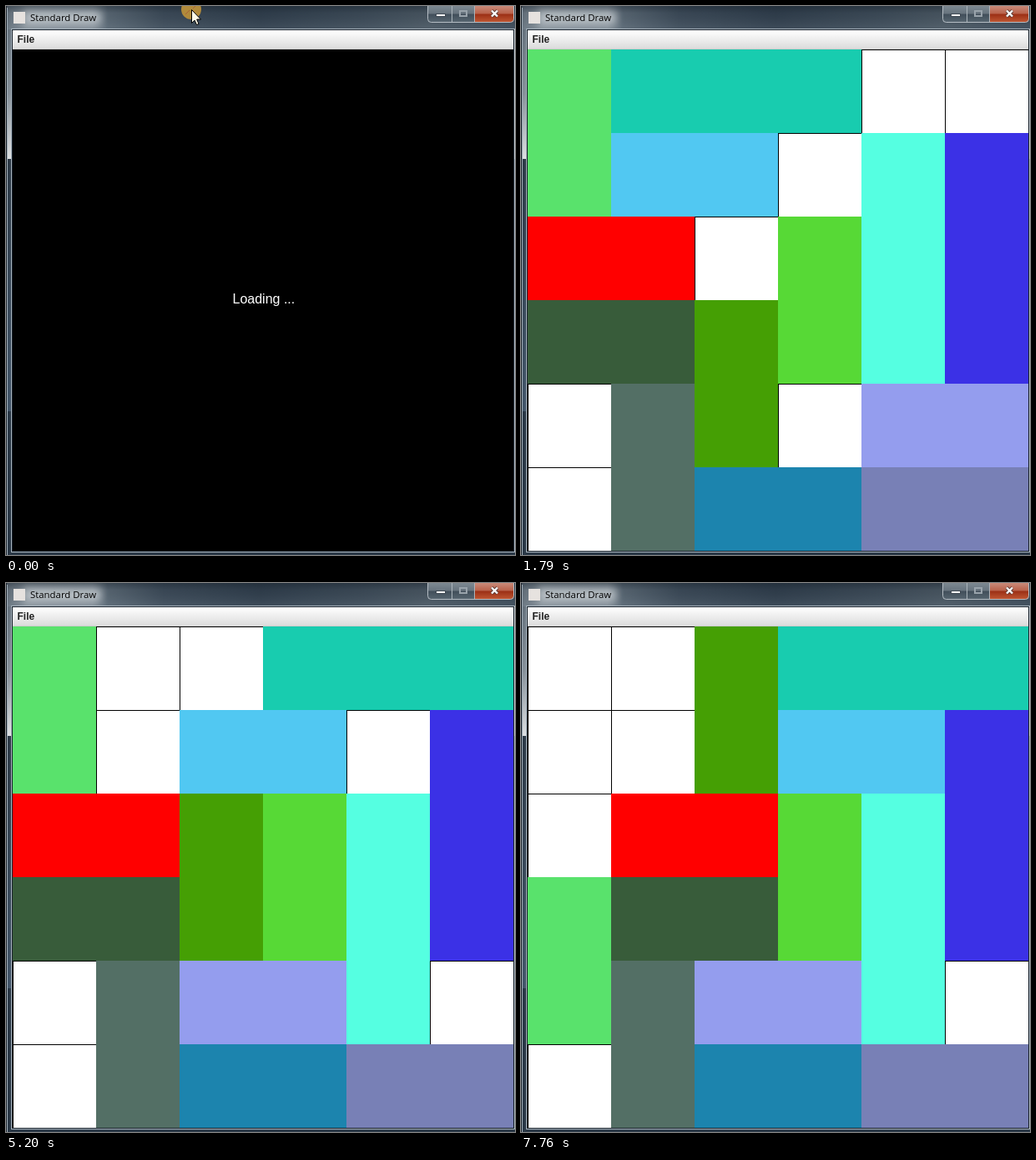
Animation of 610x657 px, one loop 8000 ms. Source, as an HTML page with a canvas:

```html
<!DOCTYPE html>
<html lang="en">
<head>
<meta charset="utf-8">
<title>Standard Draw</title>
<style>
html, body { margin: 0; width: 100%; height: 100%; overflow: hidden; background: #2b3947; }
canvas { display: block; }
</style>
</head>
<body>
<canvas id="stage" width="610" height="657"></canvas>
<script>
const ctx = document.getElementById('stage').getContext('2d');
const LOOP = 8000, CELL = 100, LEFT = 8, TOP = 52, N = 6;

// id: [column, row, width, height, colour]
const CARS = {
  teal:   [0, 0, 3, 1, '#18ccaf'],
  lime:   [3, 0, 1, 2, '#57d936'],
  aqua:   [4, 0, 1, 3, '#55ffe1'],
  blue:   [5, 0, 1, 3, '#3b31e6'],
  mint:   [0, 1, 1, 2, '#59e26c'],
  sky:    [1, 1, 2, 1, '#51c8f2'],
  red:    [2, 2, 2, 1, '#ff0000'],
  forest: [0, 3, 2, 1, '#385c3a'],
  leaf:   [2, 3, 1, 2, '#459f04'],
  slate:  [1, 4, 1, 2, '#536f65'],
  lilac:  [4, 4, 2, 1, '#949dee'],
  sea:    [2, 5, 2, 1, '#1c84ae'],
  dusk:   [4, 5, 2, 1, '#7880b6']
};

// [time, car, column step, row step]
const MOVES = [
  [830, 'red', -1, 0],
  [1060, 'lime', 0, 2],
  [1790, 'red', -1, 0], [1790, 'mint', 0, -1], [1790, 'teal', 1, 0],
  [1790, 'aqua', 0, 1], [1790, 'blue', 0, 1],
  [3340, 'leaf', 0, -1],
  [3680, 'teal', 1, 0], [4010, 'teal', 1, 0],
  [4270, 'lilac', -1, 0], [4610, 'lilac', -1, 0],
  [4930, 'aqua', 0, 1],
  [5200, 'sky', 1, 0], [5540, 'sky', 1, 0],
  [5850, 'leaf', 0, -1], [6150, 'leaf', 0, -1],
  [6470, 'red', 1, 0],
  [6800, 'mint', 0, 1],
  [7120, 'forest', 1, 0],
  [7430, 'mint', 0, 1], [7760, 'mint', 0, 1]
];

function rect(x, y, w, h, fill) {
  ctx.fillStyle = fill;
  ctx.fillRect(x, y, w, h);
}

function blend(x0, y0, x1, y1, ...stops) {
  const g = ctx.createLinearGradient(x0, y0, x1, y1);
  stops.forEach(([at, colour]) => g.addColorStop(at, colour));
  return g;
}

function text(str, x, y, font, colour) {
  ctx.font = font;
  ctx.fillStyle = colour;
  ctx.fillText(str, x, y);
}

function shape(points, fill, stroke) {
  ctx.beginPath();
  points.forEach(([x, y]) => ctx.lineTo(x, y));
  ctx.closePath();
  ctx.fillStyle = fill;
  ctx.fill();
  if (stroke) {
    ctx.strokeStyle = stroke;
    ctx.lineWidth = 1;
    ctx.stroke();
  }
}

function drawTitle() {
  rect(0, 0, 610, 28, blend(0, 0, 610, 0, [0, '#66727d'], [0.04, '#8a949c'],
    [0.17, '#818c95'], [0.2, '#5a6874'], [0.31, '#3d4b59'], [0.5, '#303e4c'],
    [0.7, '#3d4b58'], [0.83, '#4a5762'], [1, '#3a4856']));
  rect(0, 0, 610, 28, blend(0, 0, 0, 28, [0, 'rgba(20,30,40,.45)'],
    [0.3, 'rgba(20,30,40,.1)'], [1, 'rgba(140,155,168,.16)']));
  ctx.save();
  ctx.filter = 'blur(5px)';
  rect(22, 7, 92, 15, 'rgba(225,230,234,.6)');
  ctx.restore();
  rect(9, 7, 14, 14, '#e6e2df');
  text('Standard Draw', 29, 18, '11.4px "Open Sans", "Noto Sans", sans-serif', '#000');
}

function drawButtons() {
  ctx.save();
  ctx.beginPath();
  ctx.roundRect(505.5, -4, 103, 23.5, [0, 0, 4, 4]);
  ctx.clip();
  rect(505, 0, 57, 20, blend(0, 0, 0, 20, [0, '#7c8891'], [0.45, '#68747e'],
    [0.5, '#414e5a'], [1, '#596772']));
  rect(562, 0, 48, 20, blend(0, 0, 0, 20, [0, '#c98a79'], [0.45, '#b9624b'],
    [0.5, '#9b2f15'], [1, '#c25a35']));
  rect(534, 0, 1, 20, '#abb4bb');
  rect(561, 0, 1, 20, '#abb4bb');
  ctx.restore();
  ctx.strokeStyle = '#b4bcc3';
  ctx.lineWidth = 1;
  ctx.stroke();

  rect(515, 9, 12, 4, '#404a54');
  rect(516, 10, 10, 2, '#fff');
  ctx.strokeStyle = '#99a3ab';
  ctx.lineWidth = 2;
  ctx.strokeRect(544, 6, 8, 6);
  [[4, '#5b3b36'], [2.4, '#fff']].forEach(([width, colour]) => {
    ctx.strokeStyle = colour;
    ctx.lineWidth = width;
    ctx.beginPath();
    ctx.moveTo(582, 5.5); ctx.lineTo(589, 12.5);
    ctx.moveTo(589, 5.5); ctx.lineTo(582, 12.5);
    ctx.stroke();
  });
}

function drawWindow() {
  rect(0, 0, 610, 657, '#2b3947');
  drawTitle();
  rect(0, 28, 8, 155, blend(0, 28, 0, 183, [0, '#66727d'], [0.5, '#87919a'], [1, '#dde0e2']));
  rect(0, 183, 8, 302, blend(0, 183, 0, 485, [0, '#2d3a47'], [1, '#43566a']));
  rect(0, 485, 8, 172, '#2a3846');
  rect(0, 0, 1, 657, '#1b232b');
  rect(1, 2, 1, 655, '#a3b0bb');
  rect(6, 27, 604, 627, '#a9b5bf');
  rect(7, 28, 602, 625, '#17202a');
  rect(609, 28, 1, 155, '#c3cad0');
  rect(8, 29, 600, 23, blend(0, 29, 0, 52, [0, '#ffffff'], [1, '#dadada']));
  rect(8, 51, 600, 1, '#cccccc');
  text('File', 13.5, 44, 'bold 12px "Liberation Sans", Arial, sans-serif', '#222');
  drawButtons();
}

function drawBoard(t) {
  rect(LEFT, TOP, N * CELL, N * CELL, '#000');
  if (t < 500) {
    text('Loading ...', 271.5, 356, '16px "Liberation Sans", Arial, sans-serif', '#fff');
    return;
  }
  for (let i = 0; i < N * N; i++) {
    rect(LEFT + i % N * CELL + 1, TOP + Math.floor(i / N) * CELL + 1, CELL - 1, CELL - 1, '#fff');
  }
  for (const id in CARS) {
    let [col, row, w, h, colour] = CARS[id];
    for (const [at, car, dx, dy] of MOVES) {
      if (car === id && t >= at) { col += dx; row += dy; }
    }
    rect(LEFT + col * CELL, TOP + row * CELL, w * CELL, h * CELL, colour);
  }
}

function drawPointer(t) {
  if (t >= 1790) return;
  const [x, y] = t < 1600 ? [222, 4] : t < 1640 ? [400, 75] : [492, 111];
  const marked = t < 1060;
  if (marked) {
    ctx.beginPath();
    ctx.arc(x, y, 12, 0, Math.PI * 2);
    ctx.fillStyle = '#b18a3b';
    ctx.fill();
    ctx.strokeStyle = '#a8603a';
    ctx.lineWidth = 1;
    ctx.beginPath();
    ctx.moveTo(x - 7, y + 6); ctx.lineTo(x - 2, y + 1);
    ctx.moveTo(x + 2, y - 1); ctx.lineTo(x + 5, y - 4);
    ctx.stroke();
  }
  const arrow = [[0.5, 0.5], [0.5, 16.5], [4, 13], [6.5, 18.5], [9, 17.5], [6.7, 12], [11.5, 12]];
  shape(arrow.map(([dx, dy]) => [x + dx, y + dy]), marked ? '#fffbe8' : '#fff', '#000');
}

function render(now) {
  const t = now % LOOP;
  drawWindow();
  drawBoard(t);
  drawPointer(t);
}

const start = performance.now();
function tick() {
  render(performance.now() - start);
  requestAnimationFrame(tick);
}
tick();
</script>
</body>
</html>
```
